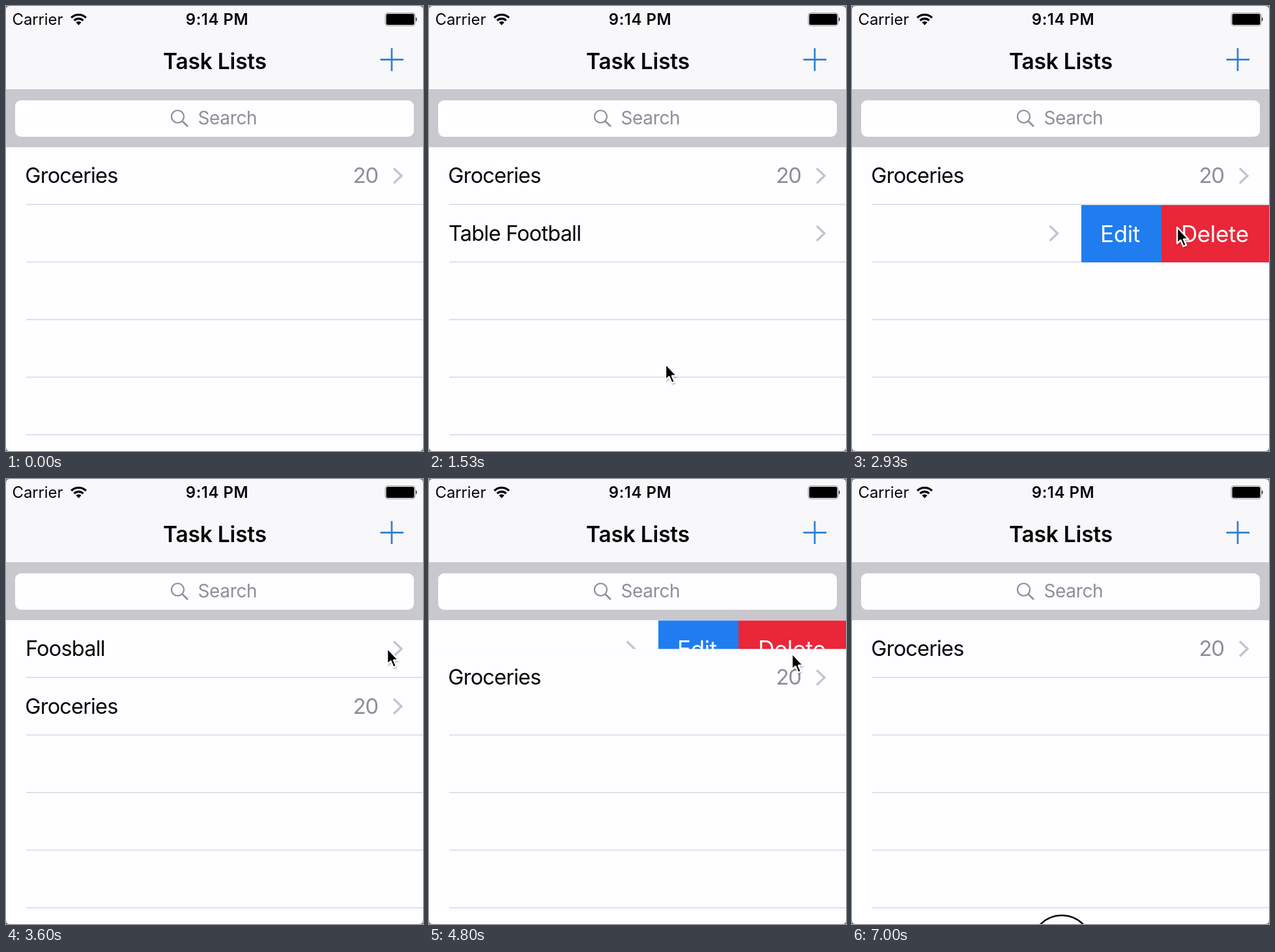
An HTML page that plays this animation: 640 by 684 pixels, repeating every 7.07 s.

```html
<!DOCTYPE html>
<html lang="en">
<head>
<meta charset="utf-8">
<title>Task Lists</title>
<style>
  html, body { margin: 0; width: 100%; height: 100%; overflow: hidden; background: #fefdff; }
  svg { display: block; width: 640px; height: 684px; }
  text { font-family: Inter, "Liberation Sans", sans-serif; fill: #060608; white-space: pre; }
  .status { font-size: 24px; letter-spacing: -.1px; }
  .time { font-size: 24px; font-weight: 600; letter-spacing: .5px; text-anchor: middle; }
  .title { font-size: 33.5px; font-weight: 600; letter-spacing: -.2px; text-anchor: middle; }
  .hint { font-size: 28px; letter-spacing: -.35px; fill: #8e8e93; }
  .name { font-size: 32.5px; letter-spacing: -.8px; }
  .count { font-size: 33px; letter-spacing: -1.4px; fill: #8e8e93; }
  .action { font-size: 35px; letter-spacing: -.4px; fill: #fff; }
  .line { fill: none; stroke-linecap: butt; }
</style>
</head>
<body>
<svg viewBox="0 0 640 684">
  <defs>
    <clipPath id="reveal"><rect id="opening" x="640" y="216" width="640" height="92"/></clipPath>
    <filter id="soft" x="-50%" y="-50%" width="200%" height="200%"><feGaussianBlur stdDeviation="1.5"/></filter>
    <path id="chevron" class="line" d="M595 249.5 L607 261 L595 272.5" stroke="#c5c5ca" stroke-width="3.4"/>
    <path id="arrow" d="M1 2 V27 L6.5 22 L10.5 31.5 L15 29.6 L11 20.5 H18.5 Z"/>
  </defs>

  <rect width="640" height="684" fill="#fefdff"/>
  <g id="separators" fill="#e1e0e5"></g>

  <g id="task">
    <g id="content">
      <text id="taskName" class="name" x="30" y="272"></text>
      <use href="#chevron"/>
    </g>
    <g clip-path="url(#reveal)">
      <rect x="340" y="217.5" width="135" height="88" fill="#1f7df0"/>
      <rect x="475" y="217.5" width="165" height="88" fill="#ea2639"/>
      <text class="action" x="381" y="274">Edit</text>
      <text class="action" x="505" y="274">Delete</text>
    </g>
  </g>

  <g id="groceries">
    <rect id="backing" y="217" width="640" height="87" fill="#fefdff"/>
    <text class="name" x="29.3" y="272">Groceries</text>
    <text class="count" x="532.5" y="272">20</text>
    <use href="#chevron"/>
  </g>

  <rect width="640" height="128" fill="#f8f7fa"/>
  <rect y="128" width="640" height="89" fill="#c9c8ce"/>
  <rect y="128" width="640" height="1" fill="#c0bfc5"/>
  <rect x="14" y="145" width="612" height="56" rx="9" fill="#fefdff"/>
  <g class="line" stroke="#8e8e93" stroke-width="2.2">
    <circle cx="263.5" cy="170" r="9.5"/>
    <path d="M270.3 176.8 L279 185.3" stroke-width="2.6"/>
  </g>
  <text class="hint" x="294.5" y="182">Search</text>

  <text class="status" x="9.5" y="29">Carrier</text>
  <g class="line" stroke="#060608" stroke-width="3.4">
    <path d="M100.2 18 A16 16 0 0 1 122.8 18"/>
    <path d="M104.6 22.4 A9.8 9.8 0 0 1 118.4 22.4"/>
  </g>
  <path d="M107.4 25.2 A5.8 5.8 0 0 1 115.6 25.2 L111.5 29.4 Z" fill="#060608"/>
  <text class="time" x="324" y="29">9:14 PM</text>
  <rect x="582" y="10.5" width="46" height="20" rx="4" fill="none" stroke="#9a9a9e"/>
  <rect x="583.5" y="12" width="43" height="17" rx="2.5" fill="#000"/>
  <path d="M629 17 Q632 20.5 629 24 Z" fill="#111"/>
  <text class="title" x="320.5" y="96.5">Task Lists</text>
  <path class="line" d="M574.5 82.3 H610 M592 64.8 V100" stroke="#2f7fd0" stroke-width="2.7"/>

  <circle id="ring" r="45.8" fill="none" stroke="#0a0a0a" stroke-width="2.6"/>
  <g id="cursor">
    <use href="#arrow" x="1" y="2.5" opacity=".4" filter="url(#soft)"/>
    <use href="#arrow" stroke="#fff" stroke-width="2.4" stroke-linejoin="round"/>
  </g>
  <path d="M0 0 H640 V684 H0 Z M6 0 Q0 0 0 6 V678 Q0 684 6 684 H634 Q640 684 640 678 V6 Q640 0 634 0 Z"
    fill="#77767a" fill-rule="evenodd"/>
</svg>

<script>
const LOOP = 7070, PITCH = 88.5, ACTIONS = 288;
const ADDED = 1330, RENAMED = 3270, DELETED = 4670, GONE = 4930, LEFT = 5530;
const el = id => document.getElementById(id);

// Each pointer move eases to a spot; equal times make a jump.
const move = (from, to, x, y) => ({ from, to, x, y });
const firstDrag = move(2270, 2600, 127, 354);
const secondDrag = move(3600, 4290, 294, 262);
const moves = [
  move(0, 600, 590, 80),
  move(930, 930, 362, 548),
  move(1530, 2000, 415, 346),
  firstDrag,
  move(2660, 2930, 498, 338),
  move(2930, 3130, 420, 346),
  move(RENAMED, RENAMED, 584, 258),
  secondDrag,
  move(4300, 4600, 556, 266),
  move(5270, LEFT, 482, 590)
];

const smooth = p => p * p * (3 - 2 * p);
function ease(t, from, to) {
  if (t >= to) return 1;
  return t <= from ? 0 : smooth((t - from) / (to - from));
}
function pointer(t) {
  let x = 322, y = 690;
  for (const m of moves) {
    const p = ease(t, m.from, m.to);
    x += (m.x - x) * p;
    y += (m.y - y) * p;
  }
  return [x, y];
}

// The row follows the pointer while dragged, then stays open.
function opened(t) {
  const drag = t < RENAMED ? firstDrag : secondDrag;
  if (t < drag.from) return 0;
  const held = Math.min(t, drag.to);
  return Math.min(ACTIONS, pointer(drag.from)[0] - pointer(held)[0]);
}

const place = (node, x, y) => node.setAttribute("transform", `translate(${x} ${y})`);
const show = (node, on) => node.setAttribute("visibility", on ? "visible" : "hidden");

for (let i = 0; i < 5; i++) {
  const line = document.createElementNS("http://www.w3.org/2000/svg", "rect");
  Object.entries({ x: 31, y: 304 + i * PITCH, width: 609, height: 2 })
    .forEach(([k, v]) => line.setAttribute(k, v));
  el("separators").append(line);
}

function draw(t) {
  const open = opened(t);
  const renamed = t >= RENAMED;
  const slide = ease(t, DELETED, GONE);

  show(el("task"), t >= ADDED && t < GONE);
  el("taskName").textContent = renamed ? "Foosball" : "Table Football";
  place(el("task"), 0, renamed ? 0 : PITCH);
  place(el("content"), -open * 1.012, 0);
  el("opening").setAttribute("x", 640 - open);

  place(el("groceries"), 0, renamed ? PITCH * (1 - slide) : 0);
  show(el("backing"), slide > 0 && slide < 1);

  show(el("cursor"), t > 0 && t < LEFT);
  place(el("cursor"), ...pointer(t));

  const lastClick = t >= 7000;
  show(el("ring"), lastClick || (t >= 6470 && t < 6530));
  place(el("ring"), lastClick ? 322 : 336, lastClick ? 716.5 : 719);
}

// The motion runs at fifteen pictures a second.
const STEP = 200 / 3;
let start;
function tick(now) {
  start ??= now;
  const n = Math.floor(((now - start) % LOOP + 4) / STEP);
  draw(Math.min(7000, Math.round(n * STEP / 10) * 10));
  requestAnimationFrame(tick);
}
draw(0);
requestAnimationFrame(tick);
</script>
</body>
</html>
```
